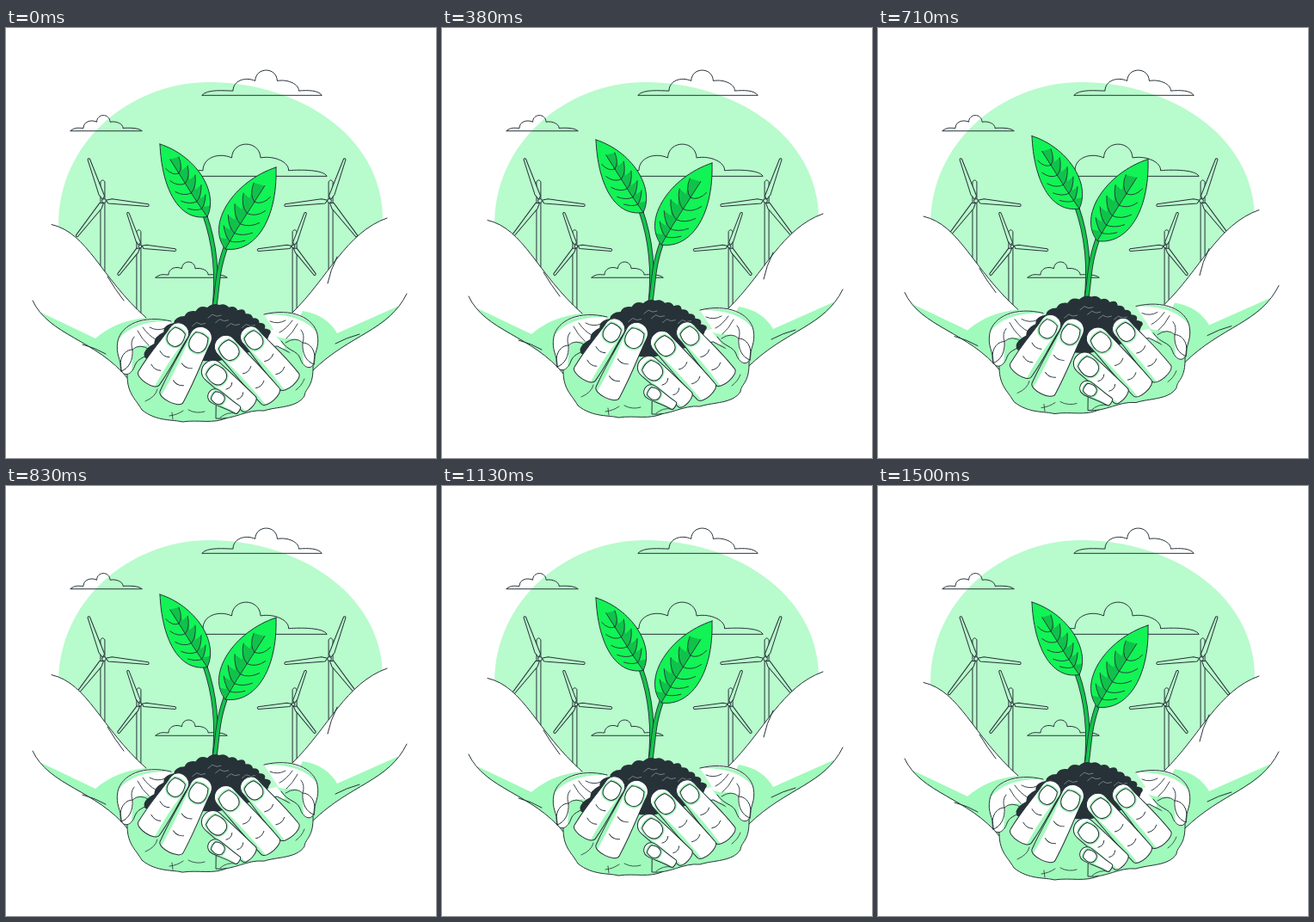
An HTML page with a canvas that plays this animation: 500x500 px, repeating every 1.54 s.

```html
<!DOCTYPE html>
<html lang="en">
<head>
<meta charset="utf-8">
<title>Seedling in hands</title>
<style>
  html, body { margin: 0; width: 100%; height: 100%; overflow: hidden; background: #fff; }
  canvas { display: block; width: 100vw; height: 100vh; }
</style>
</head>
<body>
<canvas id="stage"></canvas>
<script>
const SIZE = 500, LOOP = 1540, STEP = 1000 / 24, LAST_STEP = 36, LIFT = 10;
const INK = '#263238', WHITE = '#fff', SKY = '#b8fbcc', SHADE = '#a0fabb';
const LEAF = '#12f355', LEAF_DARK = '#10c24a', STEM = '#12c44b', GRIT = '#8b9499';

const canvas = document.getElementById('stage');
const ctx = canvas.getContext('2d');
const ratio = window.devicePixelRatio || 1;
canvas.width = canvas.height = SIZE * ratio;

const mix = (a, b, t) => [a[0] + (b[0] - a[0]) * t, a[1] + (b[1] - a[1]) * t];
const noise = n => Math.abs(Math.sin(n * 12.9898) * 43758.5453) % 1;

// Point on a cubic curve given by four points.
function along(curve, t) {
  let pts = curve;
  while (pts.length > 1) pts = pts.slice(1).map((p, i) => mix(pts[i], p, t));
  return pts[0];
}

function draw(shape, fill, stroke = INK, width = 1) {
  const path = typeof shape === 'string' ? new Path2D(shape) : shape;
  if (fill) { ctx.fillStyle = fill; ctx.fill(path); }
  if (stroke) { ctx.strokeStyle = stroke; ctx.lineWidth = width; ctx.stroke(path); }
}

function scoped(action) {
  ctx.save();
  action();
  ctx.restore();
}

// Three humps of equal width on a flat base with thin tails.
function cloud(left, right, base, start, hump, height) {
  const x = n => start + n * hump, y = n => base - n * height;
  const path = new Path2D();
  path.moveTo(left, base);
  path.bezierCurveTo(left + 6, y(0.25), x(-0.4), y(0.17), x(0), y(0.17));
  path.bezierCurveTo(x(0), y(0.58), x(0.55), y(0.75), x(1), y(0.57));
  path.bezierCurveTo(x(1.03), y(1.14), x(1.97), y(1.14), x(2), y(0.57));
  path.bezierCurveTo(x(2.5), y(0.65), x(3), y(0.42), x(2.97), y(0.17));
  path.bezierCurveTo(x(3.4), y(0.2), right - 4, y(0.2), right, base);
  path.closePath();
  draw(path);
}

function turbine(x, y, blade) {
  const half = 2.5, top = y - blade * 0.46;
  draw(`M${x - half} 350V${top + 2}Q${x} ${top - 2} ${x + half} ${top + 2}V350`, SKY);
  scoped(() => {
    ctx.translate(x + 1.6, y);
    ctx.rotate(0.1);
    const wide = blade * 0.06;
    for (let i = 0; i < 3; i++) {
      draw(`M2 -1L${blade * 0.17} ${-wide}L${blade - 1} -1.3Q${blade + 1} 0 ${blade - 1} 1.3L${blade * 0.1} ${wide * 0.8}Z`, SKY);
      ctx.rotate(Math.PI * 0.678);
    }
  });
  const hub = new Path2D();
  hub.arc(x + 1.6, y, blade * 0.045, 0, 7);
  draw(hub, SKY);
}

function background() {
  draw('M61 228C61 135 142 63 237 63C335 63 438 122 438 223C438 280 390 350 250 360C110 350 61 280 61 228Z', SKY, null);
  cloud(75, 158, 119.5, 90, 15.5, 18);
  cloud(174, 257, 290, 189, 15.5, 18);
  cloud(228, 367, 78, 264, 25.7, 29);
  cloud(217, 373, 172, 229, 33.5, 37);
  for (const mirrored of [false, true]) scoped(() => {
    if (mirrored) { ctx.translate(490, 0); ctx.scale(-1, 1); }
    turbine(112.4, 201, 52.5);
    turbine(154.4, 254, 42);
  });
}

function arms() {
  const arm = (from, top, end, low, back) => {
    draw(`M${from}C${top}L${end}C${low}`, WHITE, null);
    draw(back, SHADE, null);
    draw(`M${from}C${top}`);
  };
  arm('53 228.5', '95 238 110 290 163 337', '200 400L142 408', '105 362 50 358 31 317',
    'M39 330L104 361C120 347 140 339 163 337L185 390L142 408C110 368 68 364 39 330Z');
  arm('443 221', '395 238 375 290 333 331', '300 400L357 398', '400 356 445 352 466 309',
    'M457 323L385 355C378 342 364 332 345 329L320 380L357 398C395 360 437 354 457 323Z');
  draw('M31 317C50 358 105 362 142 408M466 309C445 352 400 356 357 398');
  draw('M118 289Q127 304 137 317M385 266Q377 282 374 297M89 368Q104 372 116 379M383 367Q396 360 411 356');
}

// Each leaf half is bounded by the midrib and one edge; veins run between them.
function leaf(tip, base, outer, inner) {
  const edges = [outer, inner].map(pair => [tip, ...pair, base]);
  const mid = t => mix(along(edges[0], t), along(edges[1], t), 0.5);
  const vein = (edge, t) => mix(mid(t - 0.12), along(edge, t - 0.12), 0.72);
  const shape = new Path2D(`M${tip}C${outer.join(' ')} ${base}C${[...inner].reverse().join(' ')} ${tip}Z`);
  const steps = [0.34, 0.46, 0.58, 0.7, 0.82];

  draw(shape, LEAF, null);
  scoped(() => {
    ctx.clip(shape);
    const teeth = steps.map(t => `L${vein(edges[1], t)}L${mix(mid(t), along(edges[1], t), 0.3)}`);
    draw(`M${mid(0.18)}${teeth.join('')}L${along(edges[1], 0.86)}L${base}L${mid(0.7)}L${mid(0.4)}Z`, LEAF_DARK, null);
  });
  let veins = `M${mid(0.18)}L${mid(0.4)}L${mid(0.65)}L${base}`;
  for (const edge of edges) for (const t of steps) {
    veins += `M${mid(t)}Q${mix(mid(t - 0.02), along(edge, t - 0.02), 0.45)} ${vein(edge, t)}`;
  }
  draw(veins, null, INK, 0.9);
  draw(shape);
}

function plant() {
  for (const stem of ['M231 217Q249 268 242 327', 'M258 248C244 284 247 300 242 327']) {
    draw(stem, null, INK, 5.6);
    draw(stem, null, STEM, 3.8);
  }
  leaf([179, 135], [234, 219.5], [[181, 185], [200, 225]], [[220, 148], [248, 190]]);
  leaf([314, 162], [255, 257], [[316, 225], [288, 262]], [[265, 178], [232, 228]]);
}

function soil() {
  const slopes = [[[162, 384], [185, 340], [215, 328], [248, 322]], [[248, 322], [275, 328], [295, 338], [306, 357]]];
  const bumps = 7, heart = [245, 372];
  let edge = 'M162 384', grit = '';
  slopes.forEach((slope, side) => {
    for (let i = 1; i <= bumps; i++) {
      const crest = along(slope, (i - 0.5) / bumps);
      edge += `Q${mix(crest, heart, -0.08 - 0.06 * noise(i + side * 9))} ${along(slope, i / bumps)}`;
      if (i % 2) {
        const [x, y] = mix(crest, heart, 0.2 + 0.25 * noise(i + side * 5));
        grit += `M${x - 7} ${y + 2}l5 -4l5 2l5 -1`;
      }
    }
  });
  draw(edge + 'L300 372L245 388L195 385Z', INK, null);
  draw(grit, null, GRIT, 0.8);
}

function thumb() {
  const outline = 'M192 341C160 333 134 345 130 364C127 380 134 385 134 398C138 407 147 402 150 392C154 382 163 385 172 372';
  draw(outline, WHITE, null);
  draw('M148 375C154 365 165 373 178 366L161 387L146 398ZM131 362C136 344 165 336 192 341Q148 340 131 362Z', SHADE, null);
  draw('M134 399C130 383 139 374 147 374C148 386 143 396 134 399Z', WHITE);
  draw(outline);
  draw('M147 374Q155 366 167 374M153 352Q158 362 166 369M159 348Q166 358 174 362M167 348Q176 353 185 349M147 374Q144 365 149 359', null, INK, 0.9);
}

function palms() {
  draw('M141 400C140 425 150 430 158 444C175 458 195 455 205 458C225 455 240 461 258 453L245 380L175 370Z', SHADE);
  draw('M357 392C358 418 348 418 347 428C338 442 315 440 300 445C280 443 265 456 244 454L245 380L315 370Z', SHADE);
  draw('M162 434Q174 429 176 420M190 451Q199 450 206 445M212 444Q221 449 231 446M193 447L194 455M249 453Q257 446 267 448M337 421Q344 416 347 408', null, INK, 0.8);
}

// A tapering finger from its tip to its root; side tells which edge is shaded.
function finger(tip, root, tipHalf, rootHalf, side) {
  const dx = root[0] - tip[0], dy = root[1] - tip[1], a = tipHalf, b = rootHalf;
  const length = Math.hypot(dx, dy) - b * 0.4, cap = a * 0.35;
  const edges = `M${length} ${-b}C${length * 0.6} ${-b - 1} ${length * 0.4} ${-a} ${a} ${-a}` +
    `C${-cap} ${-a} ${-cap} ${a} ${a} ${a}C${length * 0.4} ${a} ${length * 0.6} ${b + 1} ${length} ${b}`;
  const shape = new Path2D(`${edges}C${length + b * 0.6} ${b} ${length + b * 0.6} ${-b} ${length} ${-b}Z`);
  const nail = `M${a * 0.7} ${-a * 0.6}Q${a * 0.45} 0 ${a * 0.7} ${a * 0.6}` +
    `C${a * 1.6} ${a} ${a * 2.35} ${a * 0.75} ${a * 2.35} 0C${a * 2.35} ${-a * 0.75} ${a * 1.6} ${-a} ${a * 0.7} ${-a * 0.6}Z`;

  scoped(() => {
    ctx.translate(...tip);
    ctx.rotate(Math.atan2(dy, dx));
    draw(shape, WHITE, null);
    scoped(() => {
      ctx.clip(shape);
      draw(`M${a} ${side * a}Q${length * 0.5} ${side * (a - 5)} ${length + b} ${side * b * 0.8}V${side * b * 2}H${a}Z`, SHADE, null);
      draw(nail, null, SHADE, 4);
    });
    draw(shape);
    draw(nail, WHITE);
    if (length > 50) for (const at of [0.55, 0.8]) {
      draw(`M${length * at} ${-b * 0.45}q4 ${b * 0.45} 0 ${b * 0.9}`, null, INK, 0.9);
    }
  });
}

function fingers() {
  finger([207, 345], [163, 412], 12, 14.5, -1);
  finger([232, 349], [190, 434], 13, 15, 1);
  finger([277, 350], [333, 415], 12, 14.5, 1);
  finger([247, 361], [311, 432], 13, 14, 1);
  finger([231, 391], [286, 440], 13, 11.5, 1);
  finger([236, 424], [271, 445], 8.5, 5, 1);
}

function hands() {
  arms();
  plant();
  palms();
  thumb();
  scoped(() => {
    ctx.translate(492, -8);
    ctx.scale(-1, 1);
    thumb();
  });
  soil();
  fingers();
}

function frame() {
  const time = performance.now() % LOOP;
  const step = Math.min(LAST_STEP, Math.floor((time + 5) / STEP));
  const rise = LIFT * (1 - Math.abs(2 * step / LAST_STEP - 1));

  ctx.setTransform(ratio, 0, 0, ratio, 0, 0);
  ctx.lineCap = ctx.lineJoin = 'round';
  ctx.fillStyle = WHITE;
  ctx.fillRect(0, 0, SIZE, SIZE);
  background();
  ctx.translate(0, -rise);
  hands();
  requestAnimationFrame(frame);
}
frame();
</script>
</body>
</html>
```
